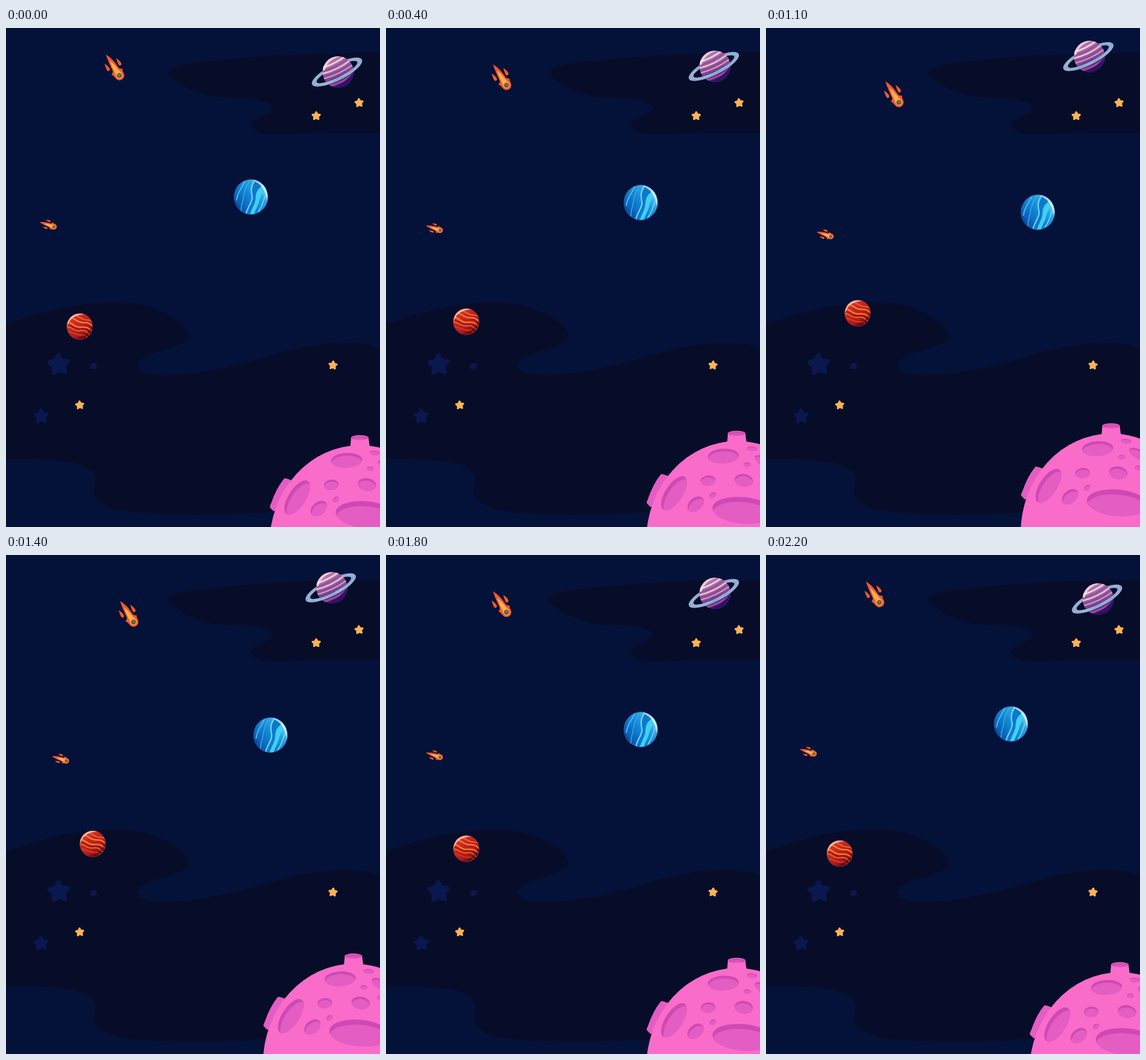
An HTML page with a canvas that plays this animation: 648x864 px, repeating every 2.3 s.

```html
<!DOCTYPE html>
<html lang="en">
<head>
<meta charset="utf-8">
<title>Space</title>
<style>
html, body { margin: 0; width: 100%; height: 100%; overflow: hidden; background: #04123a; }
canvas { display: block; width: 648px; height: 864px; }
</style>
</head>
<body>
<canvas id="stage" width="648" height="864"></canvas>
<script>
const ctx = document.getElementById('stage').getContext('2d');
const STEP = 100, FRAMES = 23, HALF = 11;

function fill(d, color) {
  ctx.fillStyle = color;
  ctx.fill(new Path2D(d));
}

function line(d, color, width) {
  ctx.strokeStyle = color;
  ctx.lineWidth = width;
  ctx.stroke(new Path2D(d));
}

function oval(x, y, rx, ry, deg = 0) {
  ctx.beginPath();
  ctx.ellipse(x, y, rx, ry, deg * Math.PI / 180, 0, Math.PI * 2);
}

function fillOval(color, ...shape) {
  oval(...shape);
  ctx.fillStyle = color;
  ctx.fill();
}

function gradient(x0, y0, x1, y1, colors) {
  const g = ctx.createLinearGradient(x0, y0, x1, y1);
  colors.forEach((c, i) => g.addColorStop(i / (colors.length - 1), c));
  return g;
}

// Draw in local space at (x, y).
function at(x, y, deg, scale, draw) {
  ctx.save();
  ctx.translate(x, y);
  ctx.rotate(deg * Math.PI / 180);
  ctx.scale(scale, scale);
  draw();
  ctx.restore();
}

function star(x, y, r, deg, color) {
  at(x, y, deg, r, () => {
    ctx.beginPath();
    for (let i = 0; i < 10; i++) {
      const a = i * Math.PI / 5 - Math.PI / 2, q = i % 2 ? 0.43 : 0.82;
      ctx.lineTo(q * Math.cos(a), q * Math.sin(a));
    }
    ctx.closePath();
    ctx.fillStyle = ctx.strokeStyle = color;
    ctx.lineWidth = 0.34;
    ctx.lineJoin = 'round';
    ctx.fill();
    ctx.stroke();
  });
}

function sky() {
  const cloud = '#070d28', dim = '#0a1850', gold = '#ffb253';
  ctx.fillStyle = '#04123a';
  ctx.fillRect(0, 0, 648, 864);
  fill('M648 43C560 43 470 46 400 53C340 58 281 62 281 78C285 88 325 119 385 121' +
    'C425 121 452 125 462 136C465 150 424 154 424 168C426 183 455 186 490 184C540 181 600 182 648 182Z', cloud);
  fill('M0 513C50 494 120 475 190 475C260 475 316 510 316 534C316 556 228 560 228 586' +
    'C232 600 260 600 285 600C350 598 400 583 440 572C500 554 545 545 590 545C615 546 635 549 648 554' +
    'V830L460 838C370 845 250 844 205 836C170 831 150 818 152 799C157 780 157 768 130 757C100 747 40 746 0 747Z', cloud);
  star(91.5, 583, 20.3, -3, dim);
  star(61, 672.5, 13.6, -3, dim);
  fillOval(dim, 151.5, 585.5, 6.5, 5, -20);
  star(537.5, 152.3, 8.4, 0, gold);
  star(611.8, 129.6, 8.4, -5, gold);
  star(566.5, 584, 8.4, 5, gold);
  star(127.8, 653, 8.3, -4, gold);
}

function comet() {
  const hot = '#f8582b';
  fill('M-43 0C-32 -5.5 -22 -6 -12 -6Q-8 -7 -7 -10.8Q-4 -8.5 0 -8.4A8.4 8.4 0 0 1 0 8.4' +
    'Q-4 8.5 -9 10.8Q-9 7 -13 5.5C-22 4 -32 3 -43 0Z', hot);
  for (const [x, y] of [[-28, -11.5], [-31, 10.5]]) {
    at(x, y, 0, 1, () => fill('M0 0Q8 -3.5 12.5 -2.6A2.7 2.7 0 0 1 12.5 2.7Q8 2.6 0 0Z', hot));
  }
  fill('M-30 0C-21 -3.2 -14 -3.4 -6 -4.4Q-3 -5.7 0 -5.6A5.6 5.6 0 0 1 0 5.6Q-3 5.7 -6 4.4C-14 3.4 -21 2.6 -30 0Z', '#ffae4a');
  fillOval('#54493f', 0, 0, 4.2, 4.2);
  fillOval('#7b6d50', -0.4, -0.4, 2.8, 2.8);
}

function bluePlanet() {
  ctx.save();
  oval(0, 0, 29.3, 30.3);
  ctx.fillStyle = gradient(-24, 18, 24, -18, ['#0850a8', '#0b6fc4', '#1289d6', '#2aa3e2', '#8ad8f8']);
  ctx.fill();
  ctx.clip();
  fill('M-31 4C-22 8 -21 18 -10 32H-31Z', '#0a4ca6');
  fill('M8 -31C0 -18 2 -8 1 2C0 12 -9 20 -10 32H0C2 22 14 10 15 -6C15 -16 20 -23 25 -29Z', '#0f78cb');
  fill('M20 -19C10 -14 8 -5 8 3C7 13 1 20 -2 32H5C7 23 12 16 14 8C16 -1 23 -9 20 -19Z', '#3fd0f2');
  line('M9 -31C-3 -18 1 -8 2 0C3 9 -7 18 -9 31', '#74d6f6', 2.2);
  line('M-10 -30C-13 -18 -24 -10 -25 6', '#52b9ec', 2);
  line('M-1 -31C-9 -19 -12 -10 -13 0C-14 9 -18 13 -17 24', '#3aa7e4', 1.6);
  line('M26 -4C20 6 22 13 12 26', '#7ad4f4', 1.8);
  fill('M2 -31C22 -29 31 -12 29 9C26 -6 21 -19 10 -25Z', 'rgba(225,248,255,.75)');
  ctx.restore();
  oval(0, 0, 29.3, 30.3);
  ctx.strokeStyle = '#31578d';
  ctx.lineWidth = 0.8;
  ctx.stroke();
}

function redPlanet() {
  ctx.save();
  oval(0, 0, 22.4, 22.9);
  ctx.fillStyle = gradient(-14, -17, 14, 18, ['#e23a2a', '#c8241e', '#b41a1a', '#700b14']);
  ctx.fill();
  ctx.clip();
  ctx.rotate(0.25);
  line('M-24 -10C-13 -14 -7 -5 4 -8S14 -9 24 -5', '#f08a36', 2.2);
  line('M-24 -2C-14 -4 -9 4 1 1S13 -3 24 3', '#f0802f', 2.4);
  line('M-23 7C-15 2 -8 11 2 7S12 5 22 10', '#e66a2a', 2);
  line('M-17 14C-9 11 -4 17 5 14S12 13 18 15', '#cf4a22', 1.6);
  line('M-14 -17C-5 -17 0 -12 9 -14S17 -14 20 -12', '#ee7a34', 1.5);
  line('M-20 2C-10 3 -8 8 0 5S10 1 20 7', '#82101a', 1.4);
  ctx.rotate(-0.25);
  fill('M-23 1C-22 -19 -4 -26 10 -21C-6 -21 -17 -14 -20 -4Z', 'rgba(255,231,218,.75)');
  fill('M23 -8C25 12 8 26 -10 21C8 20 18 10 23 -8Z', 'rgba(85,5,18,.5)');
  ctx.restore();
  oval(0, 0, 22.3, 22.8);
  ctx.strokeStyle = '#713443';
  ctx.lineWidth = 0.8;
  ctx.stroke();
}

// Part of the ring, from angle a to angle b.
function ring(a, b) {
  const bands = [[9.6, '#2b3a6b'], [8, '#b4d4f3'], [4.2, '#54709f'], [1.8, '#c2def6']];
  for (const [width, color] of bands) {
    ctx.beginPath();
    for (const side of [1, -1]) {
      const w = side * width / 2;
      ctx.ellipse(0, 0, 43.8 + w, 11.8 + w * 0.6, 0, side > 0 ? a : b, side > 0 ? b : a, side < 0);
    }
    ctx.closePath();
    ctx.fillStyle = color;
    ctx.fill();
  }
}

function ringedPlanet() {
  const tilt = -26.5;
  at(-2, 0, tilt, 1, () => ring(Math.PI, Math.PI * 2));
  ctx.save();
  oval(0, 0, 27, 27.4);
  ctx.fillStyle = gradient(-10, -24, 12, 26, ['#b673b4', '#a568ad', '#8f4f9e', '#4f2580', '#2c125f']);
  ctx.fill();
  ctx.clip();
  ctx.rotate(tilt * Math.PI / 180);
  line('M-28 -20Q0 -14 28 -20', '#f5d4c6', 3);
  line('M-28 -14Q0 -8 28 -14', '#7d4c98', 1.8);
  line('M-28 -10Q0 -3 28 -9', '#f1c8c0', 2.6);
  line('M-28 -5Q0 2 28 -4', '#80499a', 1.8);
  line('M-28 -1Q0 5 28 0', '#dea6bd', 1.8);
  line('M-28 14Q0 21 28 14', '#a34899', 3.5);
  fill('M-28 19Q0 25 28 10V30H-28Z', '#301363');
  ctx.rotate(-tilt * Math.PI / 180);
  fill('M-27 -2C-27 -21 -11 -29 3 -27C-11 -23 -20 -15 -23 -3Z', 'rgba(255,240,238,.7)');
  ctx.restore();
  at(-2, 0, tilt, 1, () => ring(0, Math.PI));
}

function crater(x, y, rx, ry, deg = 0, sx = 0) {
  ctx.save();
  fillOval('#cf49b4', x, y, rx, ry, deg);
  ctx.clip();
  fillOval('#e35dc3', x + sx, y + ry * 0.33, rx * 0.98, ry * 0.95, deg);
  ctx.restore();
}

function moon() {
  const pink = '#f96cca';
  fill('M482 780Q484 779 494 783L475 832L464 837L458 831Q456 829 459 824Q468 797 482 780Z', '#e35dc3');
  fill('M598 709L596 732H631L628 709Z', pink);
  fillOval(pink, 613, 709.5, 15.2, 4.6);
  fillOval('#cf49b4', 613, 709.8, 14.4, 3.6);
  fillOval('#dc55bd', 613, 711, 11, 2.2);
  fillOval(pink, 613.5, 894.5, 157, 172);
  crater(590, 748.5, 27, 12.8, -3);
  crater(563.5, 791, 12.7, 9, -6);
  crater(625.5, 790.5, 16, 11, 9);
  crater(542, 832, 16, 11, -40, 1.5);
  crater(571.8, 816.3, 6, 4.3, -32, 0.8);
  crater(631.2, 763.3, 6, 4, 4);
  crater(639.5, 735.8, 9.2, 4, 6);
  crater(660, 758, 17, 8, 30);
  crater(661, 782, 7, 4.2, 5);
  crater(624, 842.5, 53, 23, 5);
  crater(504.5, 813, 34, 15, -57, 3.5);
}

// x, y at rest, travel dx, dy, angle, scale, painter
const parts = [
  [575.5, 76.3, -15, -26.8, 0, 1, ringedPlanet],
  [196.5, 82, 33.7, 46.6, 57, 1, comet],
  [83, 344, 29.3, 16.8, 17, 0.6, comet],
  [424.5, 292.5, 46.6, 26.5, 0, 1, bluePlanet],
  [127.7, 516.8, 31, -23, 0, 1, redPlanet],
  [0, 0, -15.2, -20.4, 0, 1, moon]
];

const start = performance.now();

function frame() {
  const n = Math.floor(Math.max(0, performance.now() - start) / STEP) % FRAMES;
  const p = 1 - Math.abs(n - HALF) / HALF;
  sky();
  for (const [x, y, dx, dy, deg, scale, draw] of parts) {
    at(x + dx * p, y + dy * p, deg, scale, draw);
  }
  requestAnimationFrame(frame);
}
frame();
</script>
</body>
</html>
```
